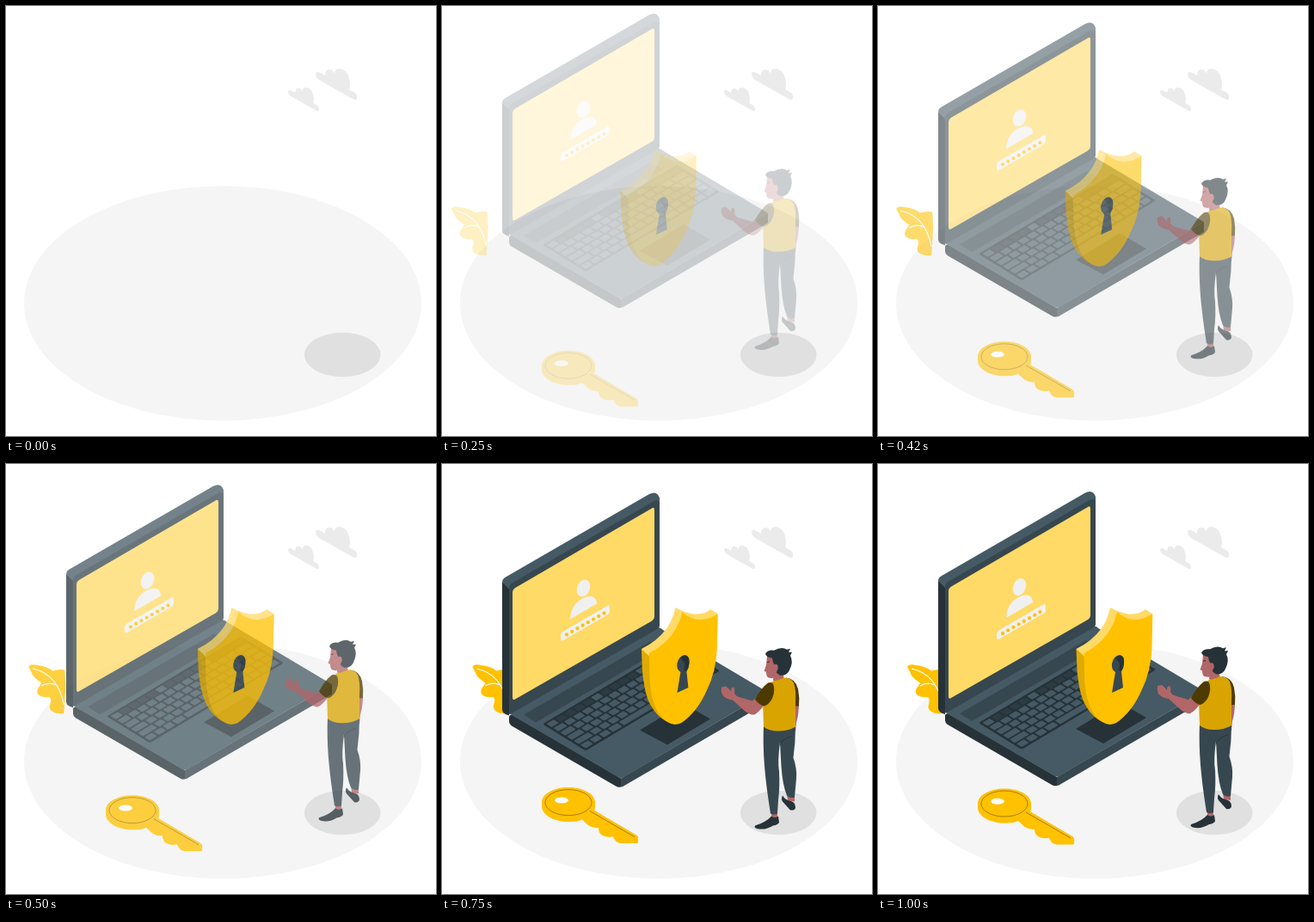
An HTML page for the animation above (1.04 s loop, 500 px wide and 500 px high).

```html
<!DOCTYPE html>
<html lang="en">
<head>
<meta charset="utf-8">
<title>Account security</title>
<style>
  html, body { margin: 0; width: 100%; height: 100%; overflow: hidden; background: #fff; }
  svg { display: block; width: 100%; height: 100%; }
</style>
</head>
<body>
<svg viewBox="0 0 500 500">
  <ellipse cx="252" cy="345.7" rx="231" ry="136.5" fill="#f5f5f5"/>
  <ellipse cx="391.2" cy="405.5" rx="44.3" ry="25.7" fill="#e0e0e0"/>

  <g fill="#ebebeb">
    <path id="cloud" d="M360 78Q362 75 366 78L371 81Q371 73 377 74Q381 75 382 79Q382 72 389 73Q397 75 399 84Q401 91 399 97L406 101Q409 104 408 108Q407 110 403 108L364 86Q360 83 360 78Z"/>
    <use href="#cloud" transform="translate(58 40.3) scale(.75)"/>
  </g>

  <g data-from="-30 0">
    <path fill="#ffc100" d="M34 236Q36 232 44 234Q55 235 62 240.500Q69 238 76 239.500L77 258L75 290Q67 291 62 288Q57 285 59 279Q61 273 58 271Q50 272 45 268Q42 263 47 258L49 254.500Q42 250 39 246Q37 241 34 236Z"/>
    <path fill="none" stroke="#fff" stroke-width="1.2" d="M39 238Q68 244 75 280M49 258Q57 253 66 257"/>
  </g>

  <g data-from="0 -30">
    <path fill="#263238" d="M78 293Q78 290 82 290L208 364V374Q205 375 202 373L81 303Q78 301 78 298Z"/>
    <path fill="#37474f" d="M208 364L379 264V275.500L212 372.500Q210 374 208 374Z"/>
    <path fill="#455a64" d="M80 290L82 286L249 189Q253 187.500 257 191.500L379 264L212 362Q208 365 204 362Z"/>
    <path fill="#37474f" d="M95 290L242 205L257 213L109 299Z"/>
    <path fill="#263238" d="M230 308L281 277L312 295L262 325Z"/>
    <g id="keys" transform="matrix(1 -.596 1 .62 117 301)" fill="#455a64">
      <rect width="156" height="50" rx="2" fill="#263238"/>
    </g>
    <path fill="#263238" d="M70 136L78 140V291Q70 289 70 284Z"/>
    <path fill="#455a64" d="M70 136Q70 132 74 130L241 33.500Q250 29 253 38V46L78 144Z"/>
    <path fill="#37474f" d="M78 143Q78 139 82 136.500L244 43Q253 38 253 45V186Q253 189 250 190.500L82 288Q78 291 78 288Z"/>
    <path fill="#ffda66" d="M82 148Q82 144 86 142L244 50Q247 48 247 52V176Q247 179 244 181L85 272Q82 274 82 270Z"/>
    <g fill="#f0f0f0">
      <ellipse cx="164.500" cy="143" rx="7.400" ry="10.200" transform="rotate(22 164.500 143)"/>
      <path d="M149 179Q150 162 163 155Q177 148 180 159V161Z"/>
      <path d="M138 198Q138 195 141 193L193 163Q195 162 195 165V170Q195 172.500 193 173.500L141 203.500Q138 205 138 202Z"/>
    </g>
    <path fill="none" stroke="#ffc100" stroke-width="4.300" stroke-linecap="round" stroke-dasharray="0 7.160" d="M145 197L188.500 172"/>
  </g>

  <g data-from="-30 0">
    <path fill="#e0aa00" d="M230.500 215L242 219L271 303Q252 300 241 280Q234 268 231.500 240Z"/>
    <path fill="#ffda66" d="M230.500 215Q249 206 260 191Q267 181 270 167Q281 173 292 174.500Q304 175 311 169L319 174L279 210L240 224Z"/>
    <path fill="#ffc100" d="M239.500 220Q257 211 267 197Q275 186 278 172Q287 181 300 181Q311 180 319.300 174L318.500 214Q317 242 307 262Q296 288 277 301Q272 304 265 302Q250 296 244 275Q240 262 240 243Z"/>
    <path fill="#37474f" d="M276 242Q271 239 272 232Q274 223 281 222Q287 223 286 232Q286 237 283 241L285 260L272 266Z"/>
    <path fill="#263238" d="M276 226Q278 222 282 222.500Q287 224 286 232Q285 238 283 241L280 240Q283 230 276 226Z"/>
  </g>

  <g data-from="0 30">
    <g fill="#d9a400">
      <use href="#key" y="4.500"/>
      <use href="#key" y="2.300"/>
    </g>
    <path id="key" fill="#ffc100" d="M147 377.500C164 377.500 178 385 178 395Q178 400 175 403L226 433Q230 436 227 438H208Q201 437 199 430Q193 432 187 429Q182 427 182 420Q176 421 170 417L163 410.500C157 413 153 413 147 413C130 413 116 405 116 395C116 385 130 377.500 147 377.500Z"/>
    <g fill="none" stroke="#a87e00" stroke-width="1">
      <ellipse cx="147" cy="395" rx="27" ry="15"/>
      <path d="M172 405L224 435"/>
    </g>
    <ellipse cx="139" cy="392.300" rx="8" ry="3.500" fill="#fff"/>
  </g>

  <g data-from="0 -30">
    <g fill="#b16668">
      <path d="M411 277L415 276Q415 290 412 299L411 310L407 309Z"/>
      <path d="M383 403H390V412H383ZM401 382H410V391L402 390Z"/>
    </g>
    <path fill="#263238" d="M383 408Q387 411 391 408L392 415Q391 418 385 419Q377 424 369 423Q362 422 364 419Q377 415 383 408ZM396 384Q399 389 404 390Q411 391 411 398Q410 402 405 401L396 391Q394 388 396 384Z"/>
    <path fill="#37474f" d="M374 302L411 304Q411 322 408.500 340Q413 353 412 364L410 386Q405 388 401 384Q396 372 394.500 350L393 322Q390 345 392 356Q393 374 391 389L390 405Q386 407 382 405Q377 374 375 350Q373 325 374 302Z"/>
    <path fill="none" stroke="#263238" stroke-width=".8" d="M393 326Q394 319 407 315"/>
    <path fill="#4d3a00" d="M400 247Q411 248 414 260Q416 270 415 280L409 280Z"/>
    <path fill="#b16668" d="M386 239L396 237L398 251Q391 256 385 250Z"/>
    <g transform="translate(0 1.300)">
      <path fill="#b16668" d="M378 220L390 219L395 238Q390 248 381 246Q377 246 377 239L374.500 238L377 231Z"/>
      <path fill="#263238" d="M376 218Q379 213 386 214Q395 209 401 213L405 212L403 216L407 216L405 220Q409 227 404 237Q401 244 393 243L389 240L390 232Q385 232 384 223Q377 222 376 218Z"/>
      <ellipse cx="388" cy="234" rx="2.700" ry="4" fill="#b16668"/>
      <path fill="none" stroke="#263238" d="M378 228L381 227"/>
    </g>
    <path fill="#b16668" d="M326 267Q324 262 325 258L330 257Q334 260 336 263Q336 258 339 258Q341 260 340 265Q342 269 347 270L361 274L370 265L376 277Q368 288 363 290Q358 291 350 284L338 273Q330 272 326 267Z"/>
    <path fill="#d9a400" d="M385 251Q391 250 398 247Q406 247 409 253Q412 262 411 275V304Q403 309 391 309Q380 309 374 304L373 274L377 257Z"/>
    <path fill="#4d3a00" d="M364 272Q371 259 379 253Q385 251 386 258Q387 265 383 273Q378 280 374 280Q368 278 364 272Z"/>
  </g>
</svg>
<script>
const LOOP = 1040, FPS = 24;
const movers = [...document.querySelectorAll('[data-from]')].map(el =>
  ({ el, from: el.dataset.from.split(' ').map(Number) }));

// Keyboard: rows of evenly split keys, with a wide space bar in the front row.
const keys = document.getElementById('keys');
function addKey(x, y, w, h, fill) {
  const key = document.createElementNS('http://www.w3.org/2000/svg', 'rect');
  const attrs = { x, y, width: w, height: h, rx: 1 };
  if (fill) attrs.fill = fill;
  for (const name in attrs) key.setAttribute(name, attrs[name]);
  keys.append(key);
}
for (let row = 0; row < 6; row++) {
  const widths = row === 5 ? [1, 1, 1, 1.2, 5, 1.2, 1, 1, 1, 1]
    : Array.from({ length: 14 }, (_, i) => i === 0 ? 1 + row * .2 : i === 13 ? 1.8 - row * .2 : 1);
  const unit = 153 / widths.reduce((a, b) => a + b);
  let x = 1.5;
  widths.forEach((n, i) => {
    const dark = row === 0 && i % 5 !== 0;
    addKey(x + .9, 2 + row * 7.9, n * unit - 1.9, 6.2, dark && '#2d3b43');
    x += n * unit;
  });
}

const bezier = (s, a, b) => 3 * a * s * (1 - s) ** 2 + 3 * b * s * s * (1 - s) + s ** 3;

// cubic-bezier(.36, -.01, .5, 1.38)
function ease(x) {
  if (x >= 1) return 1;
  let lo = 0, hi = 1;
  for (let i = 0; i < 30; i++) {
    const mid = (lo + hi) / 2;
    if (bezier(mid, .36, .5) < x) lo = mid; else hi = mid;
  }
  return bezier(lo, -.01, 1.38);
}

function draw(now) {
  // Motion advances in steps of 1/24 s.
  const step = Math.floor((now % LOOP + 4.9) * FPS / 1000);
  const p = ease(step / FPS);
  for (const { el, from: [x, y] } of movers) {
    el.setAttribute('transform', `translate(${x * (1 - p)} ${y * (1 - p)})`);
    el.setAttribute('opacity', step < 2 ? 0 : Math.min(1, Math.max(0, p)));
  }
}

function tick() {
  draw(performance.now());
  requestAnimationFrame(tick);
}
tick();
</script>
</body>
</html>
```
